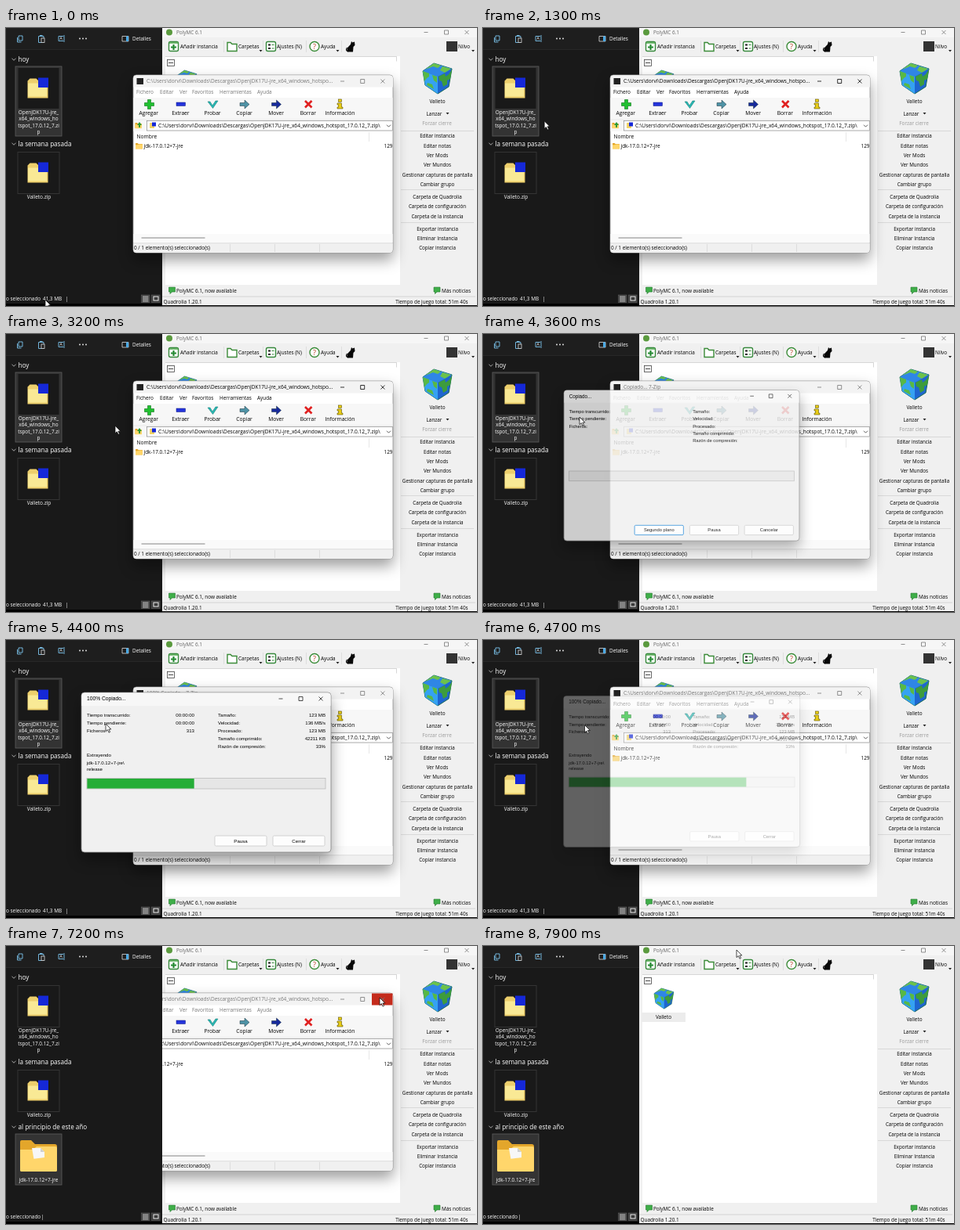
Recreate the animation shown at these times as an HTML page. Size 600x355 px, loop 8000 ms.

```html
<!DOCTYPE html>
<html lang="es">
<head>
<meta charset="utf-8">
<style>
html, body { margin: 0; width: 100%; height: 100%; overflow: hidden; background: #000; }
svg { display: block; width: 600px; height: 355px; }
text { font-family: "Open Sans", "Noto Sans", sans-serif; white-space: pre; }
#dialog text { font-family: "Liberation Sans", Arial, sans-serif; }
.window { filter: drop-shadow(0 9px 9px rgba(0, 0, 0, .38)); }
</style>
</head>
<body>
<svg id="stage" viewBox="0 0 600 355" xmlns="http://www.w3.org/2000/svg"></svg>
<script>
const DURATION = 8000, STEP = 100;
const WORLD = 'Valleto', GAME = 'Quadrolia', PLAYER = 'Nilvo';
const DIR = 'C:\\Users\\dorvi\\Downloads\\Descargas\\OpenJDK17U-jre_x64_windows_hotspo';

// Markup helpers; text is placed by its vertical centre.
const rect = (x, y, w, h, fill, more = '') =>
  `<rect x="${x}" y="${y}" width="${w}" height="${h}" fill="${fill}" ${more}/>`;
const path = (d, fill, more = '') => `<path d="${d}" fill="${fill}" ${more}/>`;
const line = (d, color, width = 1) => path(d, 'none', `stroke="${color}" stroke-width="${width}"`);
const text = (x, y, s, { fill = '#000', size = 6.4, anchor = 'start', id = '' } = {}) =>
  `<text ${id && `id="${id}"`} x="${x}" y="${y + size * .36}" font-size="${size}" fill="${fill}" text-anchor="${anchor}">${s}</text>`;
const mid = (x, y, s, opt) => text(x, y, s, { anchor: 'middle', ...opt });
const end = (x, y, s, opt) => text(x, y, s, { anchor: 'end', ...opt });
const group = (id, ...parts) => `<g id="${id}">${parts.join('')}</g>`;
const arrowDown = (x, y) => path(`M${x - 2} ${y - 1}h4l-2 2.4z`, '#222');
const windowButtons = (x, y, gap, color) =>
  line(`M${x - 2.5} ${y}h5M${x + gap - 2.5} ${y - 2.5}h5v5h-5z` +
    `M${x + 2 * gap - 2.5} ${y - 2.5}l5 5m0 -5l-5 5`, color, .8);

const folder = (x, y, s) => `<g transform="translate(${x} ${y}) scale(${s})">` +
  path('M0 2q0 -2 2 -2h12l5 5h25q3 0 3 3v30h-47z', '#e3a62b') +
  path('M0 12h16l5 -4h24q2 0 2 2v28q0 2 -2 2h-43q-2 0 -2 -2z', '#ffd66b') + '</g>';

const globe = (x, y, s) => `<g transform="translate(${x} ${y}) scale(${s})">` +
  path('M14 0L37 7L33 30L19 39L3 28L0 10z', '#1f66cf', 'stroke="#1c6b58"') +
  path('M14 0L37 7L19 17L0 10z', '#2f86e6') +
  path('M0 10L19 17V39L3 28z', '#35a2f2') +
  path('M14 0l9 3l-4 3l-6 -2l-5 2l-5 2zM25 4l11 3l-8 5l-6 -3z', '#6cc24a') +
  path('M0 10l8 3v4l-3 2l-3 4zM12 15l6 2v8l-4 -3zM6 25l6 2l2 6l-9 -5z', '#58b845') +
  path('M20 17l8 -4l1 4l4 -3l4 -6l-2 12l-4 2v5l-5 3l-2 -7l-3 -1z', '#3d9c3c') + '</g>';

const chevron = (y) => line(`M7.5 ${y - 1.3}l2.5 2.6l2.5 -2.6`, '#ccc', .8);
const light = { fill: '#fff' };
const heading = (y, s) => chevron(y) + text(15.5, y, s, { ...light, size: 8.1 });
const zipIcon = (y) => rect(15, y, 53, 53, '#191919', 'stroke="#343434"') +
  path(`M27.5 ${y + 17}l3 -3h8l3 3h12v22h-26z`, '#edcf6c') +
  path(`M28 ${y + 20}h24v17h-24z`, '#f9e995') + rect(41, y + 13, 13, 12.5, '#1528d8');
const tile = (id, y, h) => rect(12, y, 59, h, '#333', `id="${id}" stroke="#5c5c5c" stroke-width=".8"`);

function launcher() {
  const menu = [['Editar instancia', 138], ['Editar notas', 150.5], ['Ver Mods', 163], ['Ver Mundos', 175],
    ['Gestionar capturas de pantalla', 187.5], ['Cambiar grupo', 200], [`Carpeta de ${GAME}`, 215.5],
    ['Carpeta de configuración', 228], ['Carpeta de la instancia', 240.5],
    ['Exportar instancia', 256.5], ['Eliminar Instancia', 268.5], ['Copiar instancia', 281]];
  const news = (x) => path(`M${x} 331h8v6h-4l-2.5 2.5v-2.5h-1.5z`, '#3fae49', 'stroke="#28782f" stroke-width=".6"');
  const box = (x) => rect(x, 17.5, 12, 12, '#fff', 'rx="2" stroke="#37893c" stroke-width="1.4"');
  return group('launcher',
    rect(199, 0, 401, 354, '#f0f0f0'), rect(199, 0, 401, 12, '#f6f6f6'),
    '<circle cx="208" cy="5.5" r="4" fill="#5a9a3e"/>',
    text(217, 6, 'PolyMC 6.1', { fill: '#666' }), windowButtons(535, 5.5, 26, '#777'),
    box(207.5), rect(208, 18, 11, 2, '#6cb56b'), line('M213.5 21v7M210 24.5h7', '#258a32', 2.2), text(222, 24, 'Añadir instancia'),
    line('M277.5 16v15M327.5 16v15M382.5 16v15M427.5 16v15', '#d6d6d6', .7),
    path('M282 18.5h4l2 2h6v9h-12z', '#fff', 'stroke="#3b8b38" stroke-width="1.4"'), text(296, 24, 'Carpetas'), arrowDown(324.5, 29),
    box(331.5), line('M334 21.5h3M334 26h3', '#222', 2), line('M338.5 21.5h3M338.5 26h3', '#37893c'), text(345, 24, 'Ajustes (N)'),
    '<circle cx="393" cy="23.5" r="6" fill="#fff" stroke="#3b8b38" stroke-width="1.4"/>',
    mid(393, 23.5, '?', { size: 9, fill: '#b33a1d' }), text(401, 24, 'Ayuda'), arrowDown(422.5, 29),
    path('M440 17l1.5 1.5l2.5 -1l.5 4.5l-2 2l-.5 6.5h-7q-2 -4 2 -7.5q2.5 -2 2.5 -4z', '#080808'), line('M436 30q-4 -1 -1.5 -5', '#080808', 1.2),
    rect(561, 17, 14, 13, '#333'), text(576, 24, PLAYER), arrowDown(595, 29),
    rect(203, 36, 299, 292, '#fff'), line('M203 36.5h294.5v6', '#bbb', .6),
    rect(205.5, 40.5, 9, 8, '#fff', 'stroke="#444" stroke-width=".8"'), line('M207 44.5h6', '#333', .9),
    globe(218, 54, .67), rect(202, 85, 56, 12, '#ececec'), mid(230, 91, WORLD),
    globe(531, 45, 1), mid(549.5, 94, WORLD), mid(545.5, 109.5, 'Lanzar'), arrowDown(562.5, 109),
    line('M503 131.5h93M503 206.5h93M503 248.5h93', '#cfcfcf', .7),
    mid(549, 122, 'Forzar cierre', { fill: '#999' }),
    menu.map(([s, y]) => mid(549.5, y, s, { size: 6.25 })).join(''),
    news(207.5), text(217, 335.5, 'PolyMC 6.1, now available'), news(545), text(555, 335.5, 'Más noticias'),
    line('M199 343h399', '#c4c4c4', .7),
    text(200.5, 349.5, `${GAME} 1.20.1`), end(588.5, 349.5, 'Tiempo de juego total: 51m 40s', { size: 6.3 }));
}

function explorer() {
  const label = ['OpenJDK17U-jre_', 'x64_windows_ho', 'tspot_17.0.12_7.zi', 'p'];
  const viewBox = (x) => rect(x, 341, 10.5, 9.5, '#3a3a3a', 'stroke="#666" stroke-width=".6"');
  return group('explorer',
    rect(0, 0, 199, 352, '#191919'), rect(0, 0, 199, 27, '#1e1e1e'), line('M0 27.5h199', '#333', .6),
    line('M16 10h5v6h-5zM14.5 12v6h5', '#7cc4ee', .9),
    line('M41.5 10.5h6.5v8h-6.5zM43 9.5h3.5', '#7cc4ee', .9), rect(45, 13, 4, 5.5, '#1e1e1e', 'stroke="#ddd" stroke-width=".8"'),
    line('M73 10.5h-6v6h6M74 9v9', '#7cc4ee', .9), mid(70, 13.5, 'A', { size: 5, ...light }),
    [94, 98, 102].map(x => `<circle cx="${x}" cy="13.5" r=".9" fill="#eee"/>`).join(''),
    line('M148 10.5h8v6.5h-8z', '#ddd', .8), rect(153, 10.5, 3, 6.5, '#4aa9e5'), text(161, 14, 'Detalles', light),
    heading(40, 'hoy'), tile('zipTile', 49, 89), zipIcon(50.5),
    label.map((s, i) => mid(41.5, 107.5 + 8.5 * i, s, light)).join(''),
    heading(148, 'la semana pasada'), zipIcon(158.5), mid(42, 216, `${WORLD}.zip`, light),
    group('newGroup', heading(231, 'al principio de este año'), tile('jdkTile', 240, 65), folder(18, 248, 1),
      path('M33 258h11l5 5v10l-13 2z', '#f7f7f7'), path('M44 258l5 5h-5z', '#cfcfcf'),
      path('M18 274l47 -6v18q0 2 -2 2h-43q-2 0 -2 -2z', '#ffd66b'),
      mid(41.5, 299, 'jdk-17.0.12+7-jre', light)),
    text(0, 345.5, 'o seleccionado', light), text(47, 345.5, '', { id: 'fileSize', ...light }),
    viewBox(172.5), viewBox(185.5),
    line('M174 343h7.5M174 345h7.5M174 347h7.5M174 349h7.5', '#ddd', .9), rect(188, 343, 6, 5, 'none', 'stroke="#eee"'));
}

function archiver() {
  const menu = [[166, 'Fichero'], [196, 'Editar'], [221, 'Ver'], [237, 'Favoritos'], [272, 'Herramientas'], [320, 'Ayuda']];
  const labels = ['Agregar', 'Extraer', 'Probar', 'Copiar', 'Mover', 'Borrar', 'Información'];
  const arrow = (x, color) => path(`M${x - 6} 95.5h6v-3.5l6 5.5l-6 5.5v-3.5h-6z`, color, 'stroke="#18303a" stroke-width=".5"');
  const fg = { fill: 'currentColor' };
  return group('archiver',
    rect(162, 60, 331, 227, '#fff', 'class="window" rx="4" stroke="#8d8d8d" stroke-width=".8"'),
    path('M162.4 75.5v-11q0 -4 4 -4h322.6q4 0 4 4v11z', '#f3f3f3'),
    rect(466, 60.5, 26.5, 15, '#c42b1c', 'id="closeHover"'),
    rect(166.5, 64, 8.5, 8, '#222'),
    group('chrome', text(179, 68, '', { id: 'title', size: 6.5, ...fg }), windowButtons(428.5, 68, 25.7, 'currentColor'),
      menu.map(([x, s]) => text(x, 82, s, fg)).join('')),
    rect(162.4, 89, 330.2, 43, '#f7f7f7'),
    path('M180.5 91.5h4v4h4v4h-4v4h-4v-4h-4v-4h4z', '#20c030', 'stroke="#0c7418" stroke-width=".6"'),
    rect(217, 95, 11.5, 4.5, '#2434dc', 'stroke="#101a80" stroke-width=".5"'),
    path('M257 94h3l3 5l4 -6h3l-6.5 9.5z', '#28b9b4', 'stroke="#0b6f6b" stroke-width=".5"'),
    arrow(304, '#4f93a6'), arrow(344.5, '#172a9c'),
    line('M381 93l8.5 8.5m0 -8.5l-8.5 8.5', '#e02020', 2.6),
    rect(423.5, 91, 4, 3.3, '#e8cc16', 'stroke="#605400" stroke-width=".6"'),
    path('M422 96h5.5v5h1.5v2h-7v-2h1.5v-3h-1.5z', '#e8cc16', 'stroke="#605400" stroke-width=".6"'),
    labels.map((s, i) => mid(181.8 + 40.6 * i, 108.7, s, { size: 6.7 })).join(''),
    line('M162 117h331', '#ddd', .6), folder(164.5, 121, .18), path('M167 124l3 -4l3 4h-2v3h-2v-3z', '#2a9b37'),
    rect(179.5, 118.5, 313, 12.5, '#fff', 'stroke="#8b8b8b" stroke-width=".7"'),
    rect(183, 121, 6, 7, '#f2d467'), rect(186, 120.5, 5, 5, '#1528d8'),
    text(194, 124.7, DIR + 't_17.0.12_7.zip\\', { size: 6.6 }), line('M485 123.7l2.5 2.5l2.5 -2.5', '#333', .8),
    rect(163, 133, 299, 12, '#d9ebf9', 'id="headerHover"'), line('M462.5 133v12', '#ddd', .7),
    text(166.5, 139, 'Nombre', { size: 6.7 }),
    folder(165, 147, .19), text(175.5, 151, 'jdk-17.0.12+7-jre', { size: 6.45 }), end(492.5, 151, '129'),
    group('tip', rect(174.5, 145.8, 54, 11, '#f9f9f9', 'stroke="#777" stroke-width=".7"'), text(176, 151, 'jdk-17.0.12+7-jre', { size: 6.45 })),
    rect(162.4, 263, 330.2, 11, '#fafafa'), line('M172.5 268h81', '#858585', 1.1),
    path('M162.4 275h330.2v8q0 4 -4 4h-322.2q-4 0 -4 -4z', '#f0f0f0'), line('M162.4 274.7h330.2', '#c6c6c6', .6),
    line('M285.5 276v10M342.5 276v10M399.5 276v10', '#d0d0d0', .6), text(163, 281, '0 / 1 elemento(s) seleccionado(s)'));
}

function dialog() {
  const small = { size: 6.1 };
  const button = (x, w, s, edge, id) => rect(x, 250, w, 13, '#fdfdfd', `rx="1.5" stroke="${edge}" stroke-width=".8"`) + mid(x + w / 2, 256.5, s, { id, ...small });
  const left = ['Tiempo transcurrido:', 'Tiempo pendiente:', 'Ficheros:'];
  const right = ['Tamaño:', 'Velocidad:', 'Procesado:', 'Tamaño comprimido:', 'Razón de compresión:'];
  const rows = (names, x, edge, key) => names.map((s, i) =>
    text(x, 95.5 + 10 * i, s, small) + end(edge, 95.5 + 10 * i, '', { id: key + i, ...small })).join('');
  return group('dialog',
    rect(96, 67, 318, 204, '#f0f0f0', 'class="window" rx="4" stroke="#858585" stroke-width=".8"'),
    path('M96.4 84v-13q0 -3.6 4 -3.6h309.2q4 0 4 3.6v13z', '#f7f7f7'),
    text(103, 75, '', { id: 'dialogTitle', size: 6.7 }), windowButtons(350, 75, 25.5, '#222'),
    rows(left, 103, 240, 'l'), rows(right, 270, 407, 'r'),
    group('fileInfo', text(103, 147, 'Extrayendo', small), text(103, 157, 'jdk-17.0.12+7-jre\\', small), text(103, 165, 'release', small)),
    rect(103, 176.5, 304, 13.5, '#e6e6e6', 'stroke="#bcbcbc" stroke-width=".8"'),
    rect(103.4, 177, 0, 12.6, '#25ad37', 'id="bar"'),
    group('background', button(191.5, 66, 'Segundo plano', '#0078d4', 'bg')),
    button(266, 66, 'Pausa', '#c8c8c8', 'pause'), button(340, 66, '', '#c8c8c8', 'close'));
}

const stage = document.getElementById('stage');
stage.innerHTML = `<clipPath id="behind"><rect x="199" width="401" height="355"/></clipPath>` +
  rect(0, 0, 600, 355, '#000') + launcher() + explorer() + group('layer', archiver()) + dialog() +
  path('M0 0v9.6l2.3 -2l1.7 3.6l1.6 -.8l-1.7 -3.4h3z', '#fff', 'id="cursor" stroke="#000" stroke-width=".7"');

const el = {};
stage.querySelectorAll('[id]').forEach(node => el[node.id] = node);
const show = (node, on) => node.style.display = on ? '' : 'none';
const clamp = (v) => Math.max(0, Math.min(1, v));
const ramp = (t, from, to) => clamp((t - from) / (to - from));
const set = (id, s) => { el[id].textContent = s; };

// Scale about a centre combined with a fade, as windows open and close.
function pop(node, cx, cy, scale, opacity) {
  node.setAttribute('transform', `translate(${cx} ${cy}) scale(${scale}) translate(${-cx} ${-cy})`);
  node.setAttribute('opacity', opacity);
  show(node, opacity > 0);
}

// time, x, y of the pointer tip
const route = [[0, 50, 347], [300, 50, 347], [950, 58, 112], [1200, 70, 116], [1800, 180, 154], [2100, 186, 147],
  [2500, 184, 144], [2800, 182, 149], [3400, 124, 106], [3600, 123, 106], [4400, 127, 107], [5000, 132, 110],
  [5900, 133, 110], [6300, 149, 111], [6400, 149, 111], [7050, 472, 67], [7200, 476, 66], [7350, 476, 66], [7800, 323, 5], [8000, 323, 5]];
function pointer(t) {
  const i = route.findIndex((p, k) => k && t < p[0]);
  const [a, b] = [route[i - 1], route[i]];
  const p = ramp(t, a[0], b[0]), e = p * p * (3 - 2 * p);
  return [a[1] + (b[1] - a[1]) * e, a[2] + (b[2] - a[2]) * e];
}

function copyState(t) {
  const open = 1 - (1 - ramp(t, 3550, 3750)) ** 3, close = ramp(t, 4600, 4750);
  pop(el.dialog, 220, 150, (.865 + .135 * open) * (1 - .08 * close), ramp(t, 3550, 3610) * (1 - close));
  const done = ramp(t, 3650, 4300), started = done > 0, finished = done === 1;
  const title = (started ? Math.round(done * 100) + '% ' : '') + 'Copiado...';
  set('dialogTitle', title);
  const values = {
    l0: '00:00:00', l1: '00:00:00', l2: Math.round(313 * done),
    r0: '123 MB', r1: '136 MB/s', r2: Math.round(123 * done) + ' MB', r3: Math.round(42211 * done) + ' KB', r4: '33%'
  };
  for (const id in values) set(id, started ? values[id] : '');
  show(el.fileInfo, started);
  show(el.background, !finished);
  set('close', finished ? 'Cerrar' : 'Cancelar');
  el.bar.setAttribute('width', 303.2 * ramp(t, 4000, 4890));
  return title;
}

function draw(t) {
  const title = copyState(t);
  const copying = t >= 3500 && t < 4700, raised = t >= 4900, active = t >= 300 && t < 3500;
  set('title', copying ? title + ' 7-Zip' : DIR + '...');
  el.chrome.style.color = active ? '#000' : '#777';
  show(el.tip, t >= 2400 && t < 2800);
  show(el.headerHover, t >= 2000 && t < 2800);
  show(el.closeHover, t >= 7100);
  show(el.zipTile, !raised);
  show(el.newGroup, t >= 5100);
  set('fileSize', raised ? '|' : '41,3 MB   |');
  el.fileSize.setAttribute('x', raised ? 45 : 47);
  el.layer.setAttribute('clip-path', raised ? 'url(#behind)' : 'none');
  const gone = ramp(t, 7350, 7520);
  pop(el.archiver, 327.5, 173.5, 1 - .1 * gone, 1 - gone);
  el.cursor.setAttribute('transform', `translate(${pointer(t)})`);
}

function tick() {
  draw(Math.floor(performance.now() % DURATION / STEP) * STEP);
  requestAnimationFrame(tick);
}
tick();
</script>
</body>
</html>
```
